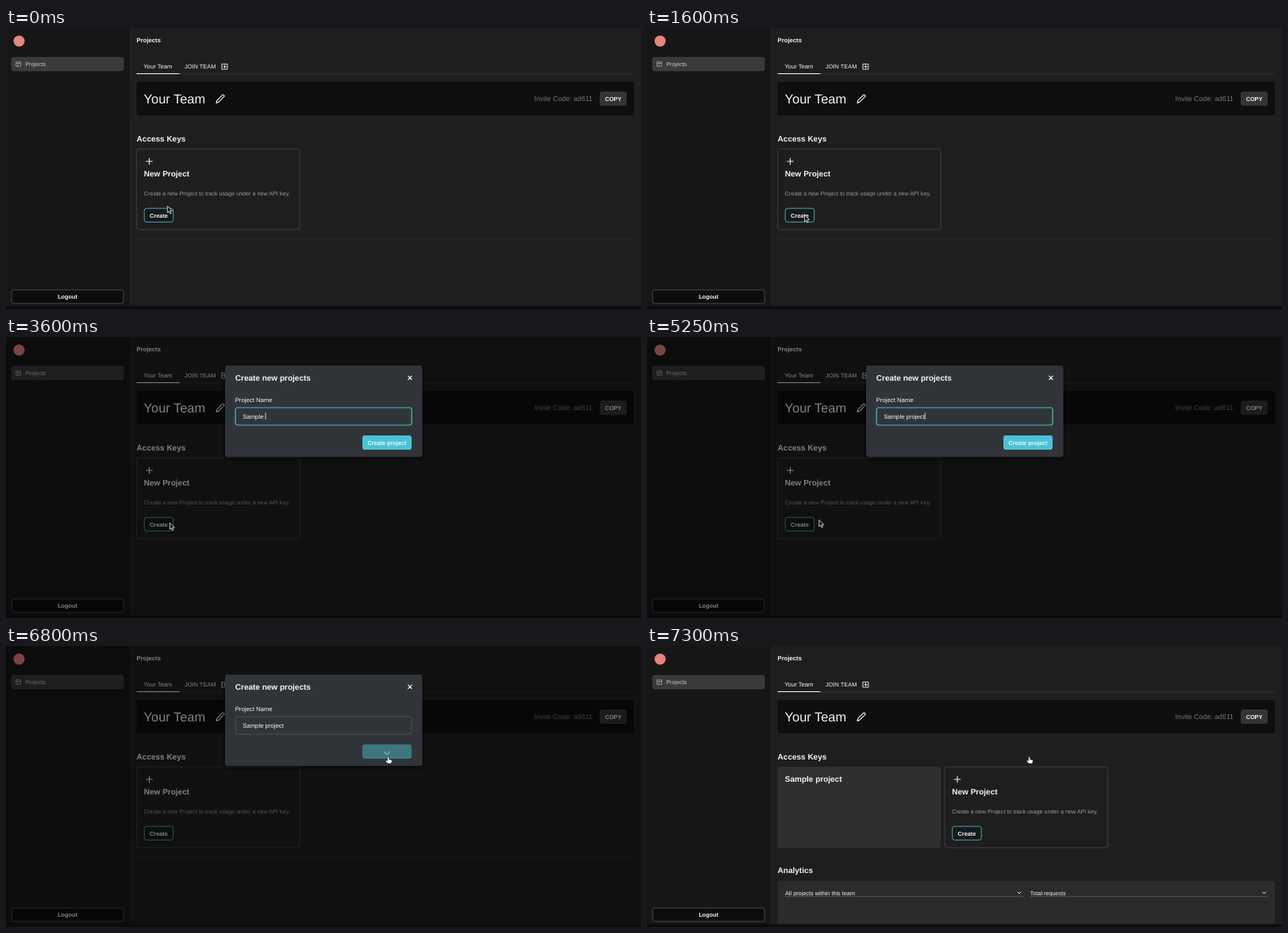
An HTML page that plays this animation: 800x354 px, repeating every 8.1 s.

```html
<!DOCTYPE html>
<html lang="en">
<head>
<meta charset="utf-8">
<title>Create a project</title>
<style>
  html, body { margin: 0; width: 100%; height: 100%; overflow: hidden; background: #1e1e1e; }
  svg { display: block; width: 800px; height: 354px; }
  text { font: 7.2px "Liberation Sans", Arial, sans-serif; fill: #f4f4f4; white-space: pre; text-rendering: geometricPrecision; }
  .bold { font-weight: bold; font-size: 7.3px; }
  .head { font-weight: bold; font-size: 10px; }
  .mid { text-anchor: middle; }
  .field { font-size: 7.75px; }
  .icon { fill: none; stroke: #f0f0f0; stroke-linecap: round; stroke-linejoin: round; }
  .rule { fill: none; stroke: #3a3a3a; stroke-width: .8; }
</style>
</head>
<body>
<svg viewBox="0 0 800 354">
  <rect width="800" height="354" fill="#1e1e1e"/>

  <!-- sidebar -->
  <rect width="154" height="354" fill="#161616"/>
  <path d="M154.5 0V354" stroke="#121212"/>
  <circle cx="16.5" cy="16.5" r="7" fill="#e5857c"/>
  <rect x="7" y="37" width="141" height="17" rx="2.5" fill="#3a3a3a" stroke="#474747" stroke-width=".6"/>
  <path class="icon" style="stroke:#a5a5a5" stroke-width=".8" d="M13 42.700h5.500v5.600h-5.500zM13 44.500h5.500M15 44.500v3.800"/>
  <text x="24.200" y="48.200" style="fill:#cfcfcf">Projects</text>
  <rect x="7" y="330" width="141" height="17" rx="2.5" fill="#0d0d0d" stroke="#565656" stroke-width=".8"/>
  <text class="bold mid" x="77.500" y="341">Logout</text>

  <!-- team header -->
  <text class="bold" x="164.600" y="18.200" style="font-size:7.7px">Projects</text>
  <text x="173.200" y="51.200" style="font-size:7.7px">Your Team</text>
  <text x="225" y="51.200" style="font-size:7.4px">JOIN TEAM</text>
  <path class="icon" stroke-width=".9" d="M272.300 45.400h6.600v6.600h-6.600zM275.600 46.900v3.600M273.800 48.700h3.600"/>
  <path class="rule" d="M164.500 58H791"/>
  <path d="M164.500 57.500H218.500" stroke="#f0f0f0"/>
  <rect x="164.500" y="68" width="626.500" height="42" rx="2" fill="#0e0e0e"/>
  <text x="173.600" y="94.800" style="font-size:16.4px">Your Team</text>
  <path class="icon" stroke-width="1.200" d="M265 94.500l.7-3.200 6.700-6.700q1-1 2.100 0t0 2.100l-6.700 6.700z"/>
  <text x="665.600" y="92.200" style="font-size:8.8px;fill:#767676">Invite Code: ad611</text>
  <rect x="748" y="80" width="34" height="18" rx="3" fill="#343434"/>
  <text class="bold mid" x="765" y="91.600">COPY</text>

  <!-- keys -->
  <text class="head" x="164.600" y="143">Access Keys</text>
  <g id="sample">
    <rect x="164.500" y="152" width="205.500" height="102.500" rx="3" fill="#2f2f2f"/>
    <text class="head" x="173.800" y="170.700">Sample project</text>
    <text class="head" x="164.600" y="286.400">Analytics</text>
    <rect x="164.500" y="296" width="626.500" height="70" rx="3" fill="#2b2b2b"/>
    <text x="174" y="313.500" style="font-size:7.3px">All projects within this team</text>
    <text x="482.800" y="313.500">Total requests</text>
    <path class="rule" style="stroke:#5c5c5c" d="M174 315.600H474M483 315.600H782"/>
    <path class="icon" d="M467 310l2 2 2-2M775.500 310l2 2 2-2"/>
  </g>
  <path id="divider" class="rule" style="stroke:#303030" d="M164.500 265.300H791"/>
  <g id="card">
    <rect x="164.700" y="152.200" width="205.300" height="101.800" rx="3" fill="#1e1e1e" stroke="#474747" stroke-width=".8"/>
    <path class="icon" stroke-width="1.100" d="M176.700 168h7.600M180.500 164.200v7.600"/>
    <text class="head" x="173.800" y="187">New Project</text>
    <text x="173.800" y="211" style="fill:#9c9c9c">Create a new Project to track usage under a new API key.</text>
    <rect id="create" x="174.200" y="227.200" width="36.500" height="17.200" rx="3" stroke="#4cb2c3" stroke-width=".9"/>
    <text class="bold mid" x="192.400" y="238.500">Create</text>
  </g>

  <!-- dialog -->
  <rect id="shade" width="800" height="354"/>
  <g id="dialog">
    <rect x="273" y="35" width="254" height="121" rx="6" opacity=".25"/>
    <rect x="276" y="36" width="248.500" height="115" rx="3" fill="#303438"/>
    <text class="head" x="288.800" y="55.300">Create new projects</text>
    <path class="icon" stroke-width="1.200" d="M506.700 49.200l4.400 4.400M511.100 49.200l-4.400 4.400"/>
    <text class="field" x="288.700" y="81.500">Project Name</text>
    <rect id="input" x="289.100" y="89" width="222" height="22" rx="3" fill="none"/>
    <text id="typed" class="field" x="298.200" y="102.800"></text>
    <path id="caret" stroke="#f4f4f4" stroke-width=".8"/>
    <rect id="submit" x="449" y="124" width="62" height="18" rx="3"/>
    <text id="label" class="bold mid" x="480" y="135.700">Create project</text>
    <path id="spinner" class="icon" style="stroke:#9cc3c8" d="M477 133.200a3 3 0 0 0 6 0"/>
  </g>

  <rect y="350.500" width="800" height="3.500" fill="#12080c"/>

  <!-- pointers, tip at 0,0 -->
  <path id="arrow" d="M0 0V8.300L1.900 6.600 3.200 9.600 4.700 9 3.400 6.100H6z" fill="#111" stroke="#eee" stroke-width=".8"/>
  <path id="hand" d="M-1 .7Q0-.7 1 .7V3.200L4 4Q5 4.300 4.800 5.500L4 8.600H-.8L-3.300 5.300Q-3.300 4-2 4.500L-1 5.300z" fill="#fff" stroke="#111" stroke-width=".6"/>
</svg>
<script>
  const LOOP = 8100, STEP = 50, NAME = "Sample project";
  const OPEN = 1600, CLICK = 6550, CLOSE = 7000;
  const KEYS = [3000, 3100, 3250, 3350, 3450, 3500, 3600, 4000, 4200, 4250, 4300, 4500, 4700, 4850];
  // pointer moves: start, end, x, y
  const MOVES = [[0, 300, 192, 237], [450, 650, 198.5, 235.5], [1950, 2100, 206.3, 234], [5150, 6000, 481.500, 139.500]];

  const $ = id => document.getElementById(id);
  const set = (id, attrs) => { for (const k in attrs) $(id).setAttribute(k, attrs[k]); };
  const show = (id, on) => set(id, { visibility: on ? "visible" : "hidden" });
  const ramp = (t, a, b) => Math.min(1, Math.max(0, (t - a) / (b - a)));
  const smooth = p => p * p * (3 - 2 * p);

  function pointer(t) {
    let x = 203.3, y = 224.3;
    for (const [a, b, toX, toY] of MOVES) {
      if (b > 5000 && t < 5250) break;
      const p = smooth(ramp(t, a, b));
      x += (toX - x) * p;
      y += (toY - y) * p;
    }
    return [x, y];
  }

  function draw(t) {
    const created = t >= CLOSE, loading = t >= CLICK;
    const [x, y] = pointer(t);
    const onCreate = t < OPEN && y > 227;
    const onSubmit = x > 449 && y < 142;

    show("sample", created);
    show("divider", !created);
    set("card", { transform: `translate(${created ? 210.5 : 0})` });
    set("create", { fill: onCreate ? "#45565a" : "#171a1b" });

    const fade = ramp(t, OPEN, OPEN + 200) * (1 - ramp(t, CLOSE, CLOSE + 200));
    const scale = .95 + .05 * smooth(fade);
    set("shade", { opacity: .48 * fade });
    set("dialog", { opacity: fade, transform: `translate(400 93) scale(${scale}) translate(-400 -93)` });
    set("input", { stroke: loading ? "#50565b" : "#43b9cd", "stroke-width": loading ? .8 : 1.2 });

    const count = KEYS.filter(k => k <= t).length;
    const typed = $("typed");
    typed.textContent = NAME.slice(0, count);
    const end = 298.6 + (count ? typed.getComputedTextLength() : 0);
    set("caret", { d: `M${end} 95.500v8.500`, opacity: count && t < 6350 ? 1 : 0 });

    set("submit", { fill: loading ? "#3f757d" : "#4bc3d9" });
    set("label", { opacity: loading ? 0 : 1 });
    set("spinner", { opacity: loading ? 1 : 0, transform: `rotate(${(t - 6800) / 450 * 360} 480 133.200)` });

    const overButton = onCreate || onSubmit;
    for (const id of ["arrow", "hand"]) {
      set(id, { transform: `translate(${x} ${y})` });
      show(id, (id === "hand") === overButton);
    }
  }

  const start = performance.now();
  function tick() {
    const t = (performance.now() - start) % LOOP;
    draw(Math.floor(t / STEP) * STEP);
    requestAnimationFrame(tick);
  }
  tick();
</script>
</body>
</html>
```
